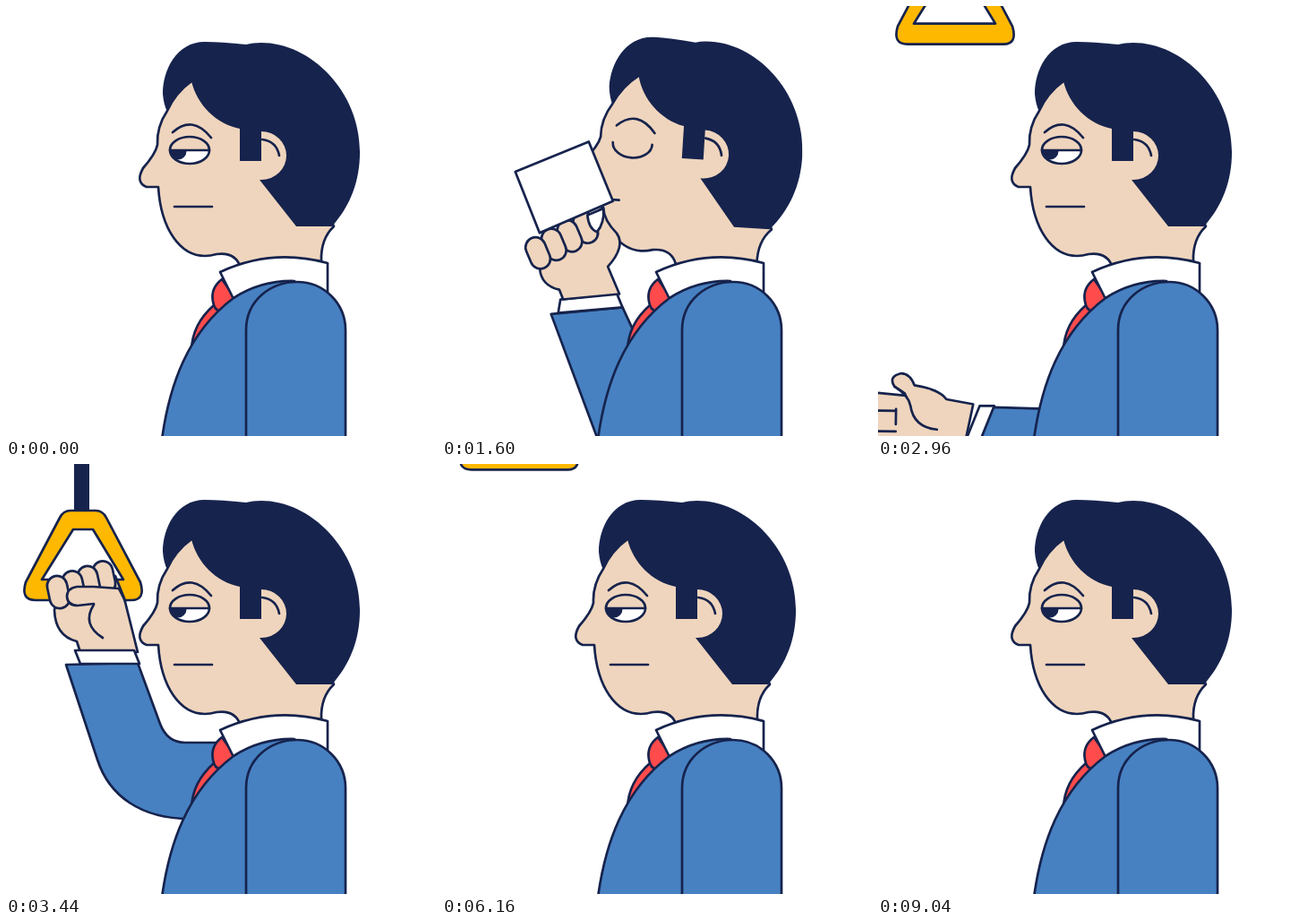
An HTML page that plays this animation: 480 by 480 pixels, repeating every 9.6 s.

```html
<!DOCTYPE html>
<html lang="en">
<head>
<meta charset="utf-8">
<title>Commuter</title>
<style>
  html, body { margin: 0; height: 100%; overflow: hidden; background: #fff; }
  svg { display: block; width: 100vw; height: 100vh; stroke: #16234d; stroke-width: 2.7; stroke-linecap: round; stroke-linejoin: round; fill: none; }
  .skin { fill: #efd5bd; }
  .blue { fill: #4781c2; }
  .red { fill: #ff4b4b; }
  .gold { fill: #ffb800; }
  .white { fill: #fff; }
  .navy { fill: #16234d; stroke: none; }
  .outer { stroke-width: 25; }
  .inner { stroke: #efd5bd; stroke-width: 19.6; }
</style>
</head>
<body>
<svg viewBox="0 0 480 480">
  <clipPath id="eyeClip"><path d="M183 161H227A22 15 0 0 1 183 161"/></clipPath>

  <g id="head">
    <path class="skin" d="M180 117Q168 135 169 155Q167 165 153 181Q144 197 157 202H170C173 250 195 279 222 279Q228 279 235 277Q256 274 262 292L270 305H352V285Q351 260 366 246L300 100L207 84Q189 97 180 117"/>
    <path class="navy" d="M207 84C213 110 235 132 261 137V173H285V140A28 27 0 0 1 285 194H283L324 246H364C385 222 395 195 395 163C395 95 340 41 285 41Q275 41 268 43Q240 40 222 40C190 40 175 72 175 98Q176 110 180 118Q189 97 207 84"/>
    <path d="M286 149Q302 151 305 167M186 141Q208 121 229 147"/>
    <g id="openEye">
      <path class="skin" d="M183 161A22 15 0 0 1 227 161"/>
      <g clip-path="url(#eyeClip)">
        <path class="white" d="M180 160H230V180H180Z"/>
        <circle id="pupil" class="navy"/>
      </g>
      <path d="M183 161H227A22 15 0 0 1 183 161"/>
    </g>
    <path id="closedEye" d="M183 160A22 16 0 0 0 227 160"/>
    <path id="mouth"/>
  </g>

  <g id="strap">
    <path class="navy" d="M76-200H93V54H76Z"/>
    <path class="gold" fill-rule="evenodd" d="M72 52H100Q108 52 112 60L150 132Q156 152 140 152H33Q16 152 22 132L60 60Q64 52 72 52ZM75 73H97L131 129H40Z"/>
  </g>

  <g id="drinkArm">
    <path class="blue" d="M120 338L200 333L280 520L190 545Z"/>
    <path class="white" d="M131 322L194 317L200 333L128 337Z"/>
    <path class="skin" d="M134 322L130 311Q110 306 109 287L150 240L182 221Q182 235 196 250Q206 265 185 287L197 318Z"/>
    <g id="cupFingers"></g>
    <path class="white" d="M164 229L182 222Q183 238 174 248Q165 244 164 229Z"/>
    <path class="white" d="M85 178L168 147L193 214L110 247Z"/>
  </g>

  <g id="gripArm">
    <path class="blue" d="M67 224L147 222L172 290Q180 311 200 311H240L300 330V396H205C150 396 115 370 102 330Z"/>
    <g id="fist">
      <path class="skin" d="M83 210L79 198Q55 192 54 163L62 130L122 125L132 150L147 210Z"/>
      <g id="gripFingers"></g>
      <path class="skin" stroke="none" d="M80 138H125L130 151L110 160H96Z"/>
      <path class="skin" d="M126 139L98 137H79Q68 139 68 148Q69 158 80 158L98 156"/>
      <path d="M98 157Q84 179 108 194M126 139L133 153"/>
    </g>
    <g id="openHand" transform="rotate(69 305 349)">
      <path class="skin" d="M108 448L78 443Q70 432 42 428Q37 415 27 415Q12 419 20 430Q30 436 35 440L-25 435V500H20L95 515Z"/>
      <path class="skin" stroke="none" d="M30 430L60 433V455L38 450Z"/>
      <path d="M20 430Q36 440 38 451Q42 475 68 477M-25 457H20M22 455V472M-25 480H22"/>
    </g>
    <path class="white" d="M77 208H143L149 223H83Z"/>
  </g>

  <g id="watchArm">
    <path class="blue" d="M250 332L95 287C60 285 48 310 48 330C50 350 60 364 78 370L215 412H300V340Z"/>
    <path class="skin" d="M62 282Q66 254 90 252Q104 252 112 262L139 290Q132 304 132 324"/>
    <g id="watchFingers"></g>
    <path class="skin" stroke="none" d="M72 264L92 255L110 264L136 291L130 313L92 271Z"/>
    <g class="white" transform="translate(123 270) rotate(45)">
      <rect x="-19" y="-8" width="38" height="14" rx="3"/>
      <circle r="6" cy="-1"/>
    </g>
  </g>

  <path class="red" d="M232 334Q208 355 207 384Q222 354 246 338Z"/>
  <path class="red" d="M241 305Q228 315 231 330Q233 341 240 340L256 326Z"/>
  <path class="white" d="M239 297Q297 270 359 287V320Q310 295 254 327Z"/>
  <path class="blue" d="M174 484C182 425 202 365 254 326Q285 306 322 307V484Z"/>
  <path class="blue" d="M268 484V362C268 328 296 308 325 308C355 308 379 332 379 362V484Z"/>
</svg>
<script>
const LOOP = 9600, STEP = 80;
const el = id => document.getElementById(id);
const show = (id, on) => el(id).style.display = on ? '' : 'none';
const place = (id, value) => el(id).setAttribute('transform', value);
const within = (t, from, to) => t >= from && t < to;

// Sine-eased 0 to 1 between two times.
function ease(t, from, to) {
  const part = Math.min(1, Math.max(0, (t - from) / (to - from)));
  return (1 - Math.cos(Math.PI * part)) / 2;
}

// Rises from 0 to 1, holds, then falls back.
const pose = (t, rise, top, leave, end) => ease(t, rise, top) - ease(t, leave, end);

// Four evenly spaced fingers: thick outlines with thinner skin strokes on top.
function addFingers(id, x, y, spaceX, spaceY, lengthX, lengthY) {
  for (let i = 3; i >= 0; i--) {
    const d = `M${x + i * spaceX} ${y + i * spaceY}l${lengthX} ${lengthY}`;
    el(id).innerHTML += `<path class="outer" d="${d}"/><path class="inner" d="${d}"/>`;
  }
}
addFingers('cupFingers', 105, 263, 18, -9, 5, 13);
addFingers('gripFingers', 57, 136, 17, -5.5, 3, 14);
addFingers('watchFingers', 74, 288, 12.5, 13.5, 13, -16);

function draw(t) {
  const drink = pose(t, 160, 900, 2240, 2720);
  const sip = pose(t, 1040, 2240, 2241, 2720);
  const grip = pose(t, 2680, 3440, 5760, 6240);
  const watch = pose(t, 6960, 7440, 8720, 9040);
  const drinkTilt = 2.2 * drink + 3.2 * sip;

  place('head', `rotate(${drinkTilt - 10 * watch} 312 278)`);
  place('strap', `translate(0 ${156 * (grip - 1)})`);
  place('drinkArm', `rotate(${105 * (drink - 1)} 215 560) rotate(${drinkTilt - 5.4} 312 285)`);
  place('gripArm', `rotate(${97 * (grip - 1)} 305 349)`);
  place('watchArm', `rotate(${95 * (watch - 1)} 305 349)`);
  show('fist', grip > 0.6);
  show('openHand', grip <= 0.6);

  const sipping = within(t, 720, 2560);
  const closed = sipping || within(t, 4000, 4160) || within(t, 4800, 4960) || within(t, 7760, 8000);
  show('openEye', !closed);
  show('closedEye', closed);
  el('mouth').setAttribute('d', sipping ? 'M180 224H194' : 'M188 224H230');

  el('pupil').setAttribute('cx', 192 + 9 * watch);
  el('pupil').setAttribute('cy', 162 + 9 * watch);
  el('pupil').setAttribute('r', 9.5 + watch);
}

function tick() {
  draw(Math.floor(performance.now() % LOOP / STEP) * STEP);
  requestAnimationFrame(tick);
}
tick();
</script>
</body>
</html>
```
